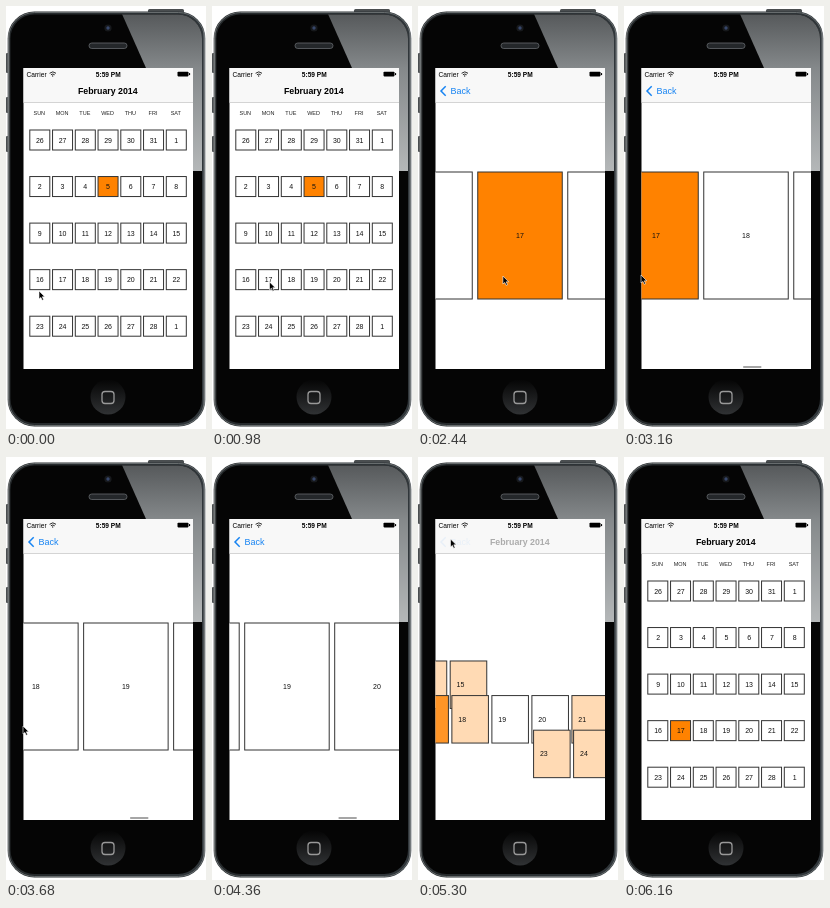
These frames come from a looping animation (200 by 423 pixels, 6.18 s). An HTML page:

```html
<!DOCTYPE html>
<html lang="en">
<head>
<meta charset="utf-8">
<title>Calendar zoom</title>
<style>
  html, body { margin: 0; width: 100%; height: 100%; overflow: hidden; background: #fff; }
  svg { display: block; width: 200px; height: 423px; }
  text { font-family: "Liberation Sans", Arial, sans-serif; fill: #000; }
  .mid { text-anchor: middle; }
  .status { font-size: 6.6px; }
  .title { font-size: 8.8px; font-weight: bold; }
  .back text { font-size: 9px; fill: #1683f2; }
  .days text { font-size: 5.5px; fill: #222; }
  .cell rect { stroke: #333; stroke-width: 1; }
  .cell text { font-size: 7px; fill: #111; }
</style>
</head>
<body>
<svg viewBox="0 0 200 423">
  <defs>
    <linearGradient id="metal" x2="1" y2="0">
      <stop offset="0" stop-color="#777"/><stop offset=".015" stop-color="#24282a"/>
      <stop offset=".985" stop-color="#30363a"/><stop offset="1" stop-color="#8b8f92"/>
    </linearGradient>
    <linearGradient id="shine" x1="0" y1="0" x2="0" y2="1">
      <stop offset="0" stop-color="#56595b"/><stop offset=".35" stop-color="#85898b"/>
      <stop offset="1" stop-color="#b4b7b8"/>
    </linearGradient>
    <linearGradient id="ring" x2="0" y2="1">
      <stop offset="0" stop-color="#050505"/><stop offset="1" stop-color="#303234"/>
    </linearGradient>
    <clipPath id="screen"><rect x="17.5" y="62" width="169.5" height="301"/></clipPath>
    <clipPath id="face"><rect x="4.5" y="8.5" width="191.5" height="408.5" rx="24"/></clipPath>
  </defs>

  <!-- phone body -->
  <g fill="#4a4e50">
    <rect x="0" y="47" width="4" height="20" rx="1"/>
    <rect x="0" y="91" width="4" height="16" rx="1"/>
    <rect x="0" y="130" width="4" height="16" rx="1"/>
    <rect x="142" y="3" width="36" height="5" rx="1.5"/>
  </g>
  <rect x="1.5" y="5.5" width="198" height="415" rx="27" fill="url(#metal)"/>
  <rect x="2.5" y="6.5" width="196" height="413" rx="26" fill="none" stroke="#777b7d" stroke-width=".8"/>
  <g clip-path="url(#face)">
    <rect width="200" height="423" fill="#050505"/>
    <path d="M116 8H200V165H187L140 62Z" fill="url(#shine)"/>
  </g>
  <circle cx="102" cy="22" r="3.6" fill="#17191c"/>
  <circle cx="102" cy="22" r="1.7" fill="#37476a"/>
  <rect x="83" y="37" width="38" height="5.5" rx="2.7" fill="#24272a" stroke="#65696c" stroke-width=".8"/>
  <circle cx="102" cy="391" r="17.5" fill="url(#ring)"/>
  <rect x="96" y="385.5" width="12" height="12" rx="3" fill="none" stroke="#999" stroke-width="1.3"/>

  <!-- screen -->
  <g clip-path="url(#screen)">
    <rect x="17" y="62" width="171" height="302" fill="#fff"/>
    <g id="cells"></g>
    <g id="days" class="days"></g>
    <rect id="bar" y="360.3" width="18.5" height="1.4" rx=".7" fill="#888"/>
    <rect x="17" y="62" width="171" height="34.5" fill="#f8f8f8"/>
    <path d="M17 96.5H188" stroke="#c4c4c4" stroke-width=".7"/>
    <text class="status" x="20.5" y="70.6">Carrier</text>
    <g fill="none" stroke="#111" stroke-width=".9">
      <path d="M43.6 67.3Q46.8 64.4 50 67.3M44.9 68.8Q46.8 67.2 48.7 68.8"/>
      <circle cx="46.8" cy="70" r=".3"/>
    </g>
    <text class="status mid" x="102.3" y="70.6" font-weight="bold">5:59 PM</text>
    <rect x="171.5" y="65.8" width="11" height="4.6" rx=".8"/>
    <rect x="183" y="67.1" width="1.1" height="2"/>
    <text id="title" class="title mid" x="101.8" y="88.3">February 2014</text>
    <g id="back" class="back">
      <path d="M27.7 80.3L23 85L27.7 89.7" fill="none" stroke="#1683f2" stroke-width="1.5"/>
      <text x="32.5" y="88.2">Back</text>
    </g>
  </g>
  <path id="cursor" d="M0 0V8L1.9 6.4L3.2 9.3L4.6 8.7L3.3 5.8H5.8Z" fill="#000" stroke="#fff" stroke-width=".6"/>
</svg>
<script>
const LOOP = 6180, ZOOM = 350, OPEN = 1282, CLOSE = 5067, PICK = 1180, FLING = 3660;
const FIRST = 10, CHOSEN = 22, PAGE = 90, END = 222;
const $ = id => document.getElementById(id);
const clamp = v => Math.max(0, Math.min(1, v));
const smooth = v => { v = clamp(v); return v * v * (3 - 2 * v); };
const mix = (a, b, p) => a + (b - a) * p;
const tint = a => `rgb(255,${Math.round(mix(255, 130, a))},${Math.round(mix(255, 0, a))})`;

function add(parent, tag, attrs = {}, label = "") {
  const el = document.createElementNS("http://www.w3.org/2000/svg", tag);
  for (const key in attrs) el.setAttribute(key, attrs[key]);
  el.textContent = label;
  return parent.appendChild(el);
}
function set(el, attrs) {
  for (const key in attrs) el.setAttribute(key, attrs[key]);
}

const colX = c => 33.8 + c * 22.75;
const rowY = r => 134 + r * 46.55;

"SUN MON TUE WED THU FRI SAT".split(" ").forEach((d, i) =>
  add($("days"), "text", { x: colX(i) - .5, y: 109, class: "mid" }, d));

const cells = Array.from({ length: 35 }, (_, i) => {
  const g = add($("cells"), "g", { class: "cell" });
  const day = i < 6 ? 26 + i : (i - 6) % 28 + 1;
  return { rect: add(g, "rect"), label: add(g, "text", { class: "mid" }, day) };
});

// Pointer stops: time, x, y
const stops = [
  [0, 33, 285], [150, 33, 285], [850, 57, 276], [2500, 85, 270], [3100, 17, 269],
  [3170, 17, 269], [3330, 107, 270], [3360, 107, 270], [FLING, 17, 269],
  [3820, 17, 269], [4500, 17, 150], [4900, 32.5, 82], [5450, 32.5, 82], [5800, 12, 110]
];
const shown = [[0, 1420], [2400, 3850], [4580, 5700]];

function pointer(t) {
  let n = stops.findIndex(s => s[0] > t);
  if (n < 0) return stops[stops.length - 1].slice(1);
  const a = stops[n - 1], b = stops[n], p = smooth((t - a[0]) / (b[0] - a[0]));
  return [mix(a[1], b[1], p), mix(a[2], b[2], p)];
}

// Two drags, then the list coasts to rest
function scroll(t) {
  if (t < FLING) return 70 * smooth((t - 2500) / 600) + 89.5 * smooth((t - 3360) / 300);
  return END - 62.5 * Math.exp((FLING - t) / 490);
}

function drawCell(cell, i, t, zoom, off, closing) {
  const line = 102 + (i - CHOSEN) * PAGE - off;
  const x = mix(colX(i % 7), line, zoom);
  const y = mix(rowY(Math.floor(i / 7)), 229.5, zoom);
  const w = mix(20, 84.5, zoom), h = mix(20, 127, zoom);
  let glow = i === (t < PICK ? FIRST : CHOSEN) ? 1 : 0;
  if (closing) {
    const hidden = line + 42 < 17 || line - 42 > 187;
    if (i === CHOSEN) glow = 1 - .6 * zoom;
    else if (hidden) glow = zoom * 1.15;
  }
  set(cell.rect, { x: x - w / 2, y: y - h / 2, width: w, height: h, fill: tint(clamp(glow)) });
  set(cell.label, { x: closing ? x - w / 2 + 10.3 : x, y: y + 2.5 });
}

function draw(t) {
  const closing = t >= CLOSE;
  const p = smooth((t - (closing ? CLOSE : OPEN)) / ZOOM);
  const zoom = closing ? 1 - p : p;
  const off = scroll(Math.min(t, CLOSE));
  cells.forEach((c, i) => drawCell(c, i, t, zoom, off, closing));

  $("title").style.opacity = closing ? p ** 4 : 1 - p;
  $("back").style.opacity = closing ? (1 - p) ** 2 : p ** 6;
  $("days").style.opacity = closing ? clamp((p - .8) * 5) : clamp(1 - p * 4);

  $("bar").style.opacity = clamp((t - 2500) / 60) * clamp((5050 - t) / 200);
  set($("bar"), { x: 119 + (off - 70) * .054 });

  const [x, y] = pointer(t);
  set($("cursor"), { transform: `translate(${x} ${y})` });
  $("cursor").style.opacity = shown.some(([a, b]) => t >= a && t < b) ? 1 : 0;
}

const start = performance.now();
function tick() {
  draw((performance.now() - start) % LOOP);
  requestAnimationFrame(tick);
}
tick();
</script>
</body>
</html>
```
